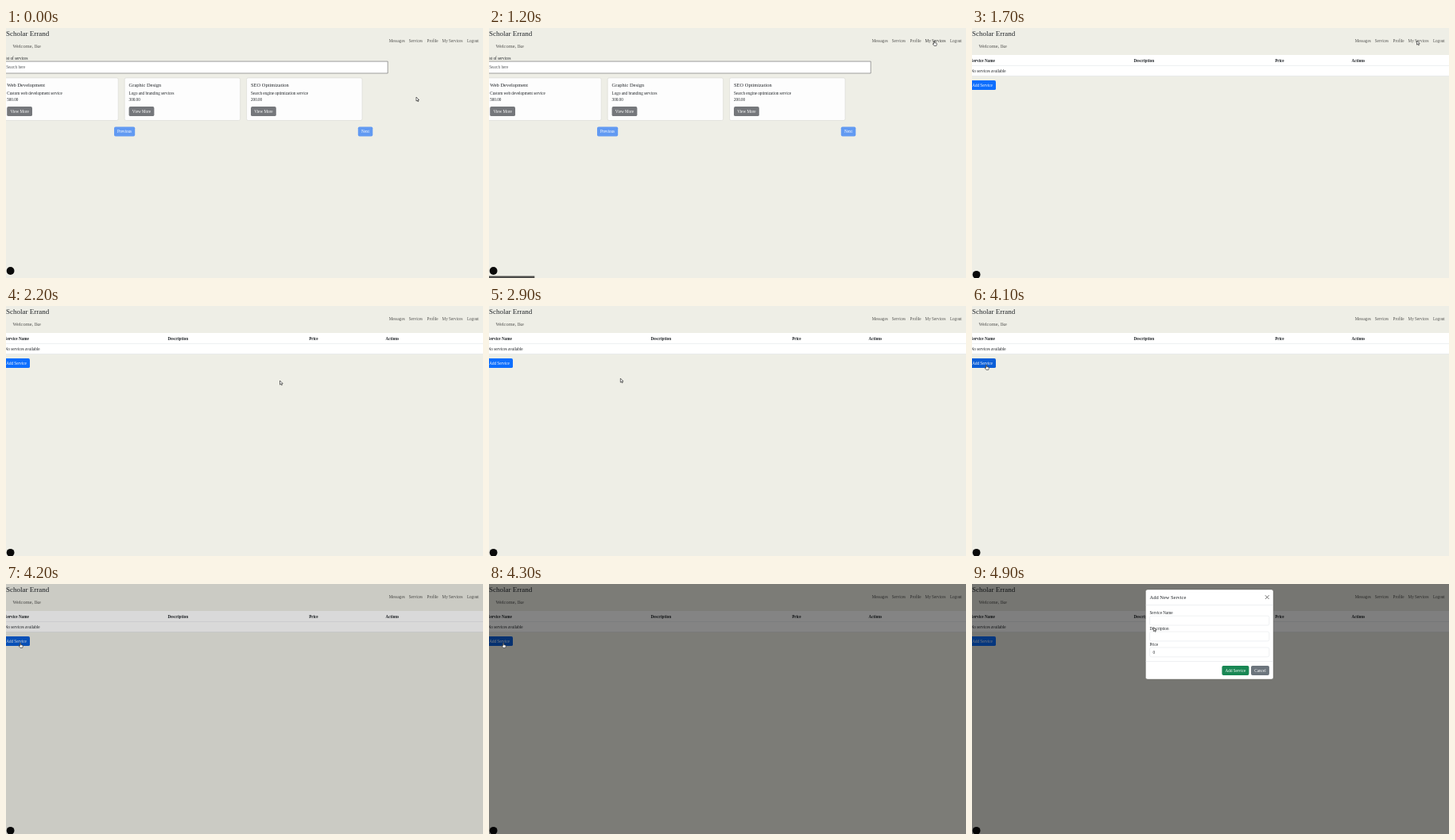
An HTML page with a canvas for the animation above (5000 ms loop, 600 by 315 pixels).

```html
<!DOCTYPE html>
<html lang="en">
<head>
<meta charset="utf-8">
<title>Service dashboard</title>
<style>
html, body { margin: 0; width: 100%; height: 100%; overflow: hidden; background: #eeeee6; }
canvas { display: block; width: 600px; height: 315px; }
</style>
</head>
<body>
<canvas id="stage" width="600" height="315"></canvas>
<script>
const ctx = document.getElementById('stage').getContext('2d');
const LOOP = 5000, STEP = 100;
const ZOOM = 0.3215; // page pixels to stage pixels
const INK = '#212529', RULE = '#dee2e6';

const clamp = (v) => Math.max(0, Math.min(1, v));
const easeOut = (p) => 1 - Math.pow(1 - p, 2.2);

function text(str, x, y, { size = 16, color = INK, bold = false, align = 'left' } = {}) {
  ctx.save();
  ctx.translate(x, y);
  ctx.scale(ZOOM, ZOOM);
  ctx.font = `${bold ? 'bold ' : ''}${size}px "Liberation Serif", serif`;
  ctx.textAlign = align;
  ctx.fillStyle = color;
  ctx.fillText(str, 0, 0);
  ctx.restore();
}

function box(x, y, w, h, fill, { radius = 0, stroke, line = 0.5 } = {}) {
  ctx.beginPath();
  ctx.roundRect(x, y, w, h, radius);
  ctx.fillStyle = fill;
  ctx.fill();
  if (stroke) {
    ctx.strokeStyle = stroke;
    ctx.lineWidth = line;
    ctx.stroke();
  }
}

function button(label, x, y, w, fill) {
  box(x, y, w, 12.1, fill, { radius: 1.9 });
  text(label, x + w / 2, y + 7.7, { color: '#fff', align: 'center' });
}

function header(hover) {
  text('Scholar Errand', 0, 10, { size: 28 });
  text('Welcome, Ike', 8.4, 25, { size: 20, color: 'rgba(0,0,0,.65)' });
  const links = [['Messages', 481.7], ['Services', 506.7], ['Profile', 529.6],
                 ['My Services', 548.6], ['Logout', 579.9]];
  for (const [label, x] of links) {
    const alpha = hover && label === 'My Services' ? 0.8 : 0.65;
    text(label, x, 17.6, { color: `rgba(0,0,0,${alpha})` });
  }
}

function badge(y) {
  ctx.fillStyle = '#0a0a0a';
  ctx.beginPath();
  ctx.arc(5.6, y, 4.9, 0, Math.PI * 2);
  ctx.fill();
}

function listPage(t) {
  text('List of services', -3.9, 39.8);
  box(-4, 42.1, 484.2, 14.9, '#fff', { stroke: '#777', line: 0.7 });
  text('Search here', 0.2, 51.3, { color: '#595c5f' });
  const cards = [
    ['Web Development', 'Custom web development service', '500.00'],
    ['Graphic Design', 'Logo and branding services', '300.00'],
    ['SEO Optimization', 'Search engine optimization service', '200.00']
  ];
  cards.forEach(([name, about, price], i) => {
    const x = 1.2 + i * 153.4;
    box(x - 5.4, 62.9, 145.4, 53.6, '#fdfdfd', { radius: 1.9, stroke: '#d3d3cd' });
    text(name, x, 74.2, { size: 20 });
    text(about, x, 83.8);
    text(price, x, 91.6);
    button('View More', x, 99, 31.8, '#75777b');
  });
  button('Previous', 136, 124.4, 26.2, '#629af2');
  button('Next', 442.8, 124.4, 18.5, '#629af2');
  badge(306);
  if (t >= 800 && t < 1400) box(0, 312.5, 57.3, 3, '#4b4b49');
}

function tablePage(t) {
  box(0, 34, 600, 26.4, '#fff');
  box(0, 47, 600, 0.5, RULE);
  box(0, 60.1, 600, 0.5, RULE);
  const columns = [['Service Name', -1.4], ['Description', 203.6], ['Price', 381.2], ['Actions', 477.6]];
  for (const [label, x] of columns) text(label, x, 42.5, { bold: true });
  text('No services available', -1.4, 55.6);
  const hover = t >= 3900 && t < 4400;
  button('Add Service', -4, 66, 34, hover ? '#0b5ed7' : '#0d6efd');
  badge(310.8);
}

function modal(t) {
  const shown = clamp((t - 4305) / 150);
  if (!shown) return;
  ctx.save();
  ctx.globalAlpha = shown;
  ctx.translate(0, -16 * (1 - easeOut(clamp((t - 4305) / 300))));
  box(218.4, 7, 160.6, 113, '#fff', { radius: 2.5, stroke: '#666660', line: 0.4 });
  text('Add New Service', 223.6, 18.9, { size: 20 });
  ctx.strokeStyle = '#555';
  ctx.lineWidth = 0.85;
  ctx.beginPath();
  ctx.moveTo(368.8, 14.2); ctx.lineTo(373.6, 19);
  ctx.moveTo(373.6, 14.2); ctx.lineTo(368.8, 19);
  ctx.stroke();
  box(218.6, 26.3, 160.2, 0.5, RULE);
  ['Service Name', 'Description', 'Price'].forEach((label, i) => {
    const y = 37.7 + i * 19.9;
    text(label, 223.5, y);
    box(223.6, y + 2.5, 150.2, 11.8, '#fff', { radius: 1.9, stroke: RULE });
  });
  text('0', 227.6, 87.6);
  box(218.6, 97.1, 160.2, 0.5, RULE);
  button('Add Service', 314.4, 102.9, 34, '#198754');
  button('Cancel', 351, 102.9, 22.9, '#6c757d');
  ctx.restore();
}

// time, x, y of the pointer tip
const route = [
  [0, 516, 87], [100, 516, 87], [600, 559, 19], [700, 559.5, 16], [1700, 559.5, 16],
  [2200, 344.5, 94], [2800, 190, 92], [3400, 42, 87], [3500, 38, 85],
  [3900, 17.5, 74], [4400, 17.5, 74], [4600, 68, 74], [4900, 228.3, 54.5], [5000, 228.3, 54.5]
];

function pointerAt(t) {
  const i = route.findIndex((k, n) => n > 0 && t <= k[0]);
  const [t0, x0, y0] = route[i - 1], [t1, x1, y1] = route[i];
  const p = (t - t0) / (t1 - t0);
  return [x0 + (x1 - x0) * p, y0 + (y1 - y0) * p];
}

const arrow = new Path2D('M0 0V5.1L1.2 4L2 5.8L2.9 5.4L2.1 3.7H3.7Z');
const hand = new Path2D('M0 .5Q.6-.2 1.1.5V2.6L3.5 3.2Q4 3.5 3.8 4.3L3.2 6.4H.4L-1.4 4.1Q-1.3 3.2-.5 3.7L0 4.1Z');

function pointer(t) {
  const [x, y] = pointerAt(t);
  const overLink = (t >= 700 && t < 1700) || (t >= 3900 && t < 4400);
  const shape = overLink ? hand : arrow;
  ctx.save();
  ctx.translate(x, y);
  ctx.fillStyle = '#fff';
  ctx.strokeStyle = '#222';
  ctx.lineWidth = 0.65;
  ctx.fill(shape);
  ctx.stroke(shape);
  ctx.restore();
}

function draw(t) {
  box(0, 0, 600, 315, '#eeeee6');
  header(t >= 700 && t < 1700);
  (t < 1700 ? listPage : tablePage)(t);
  const dim = 0.5 * clamp((t - 4155) / 150);
  if (dim) box(0, 0, 600, 315, `rgba(0,0,0,${dim})`);
  modal(t);
  pointer(t);
}

function tick() {
  const t = performance.now() % LOOP;
  draw(Math.floor(t / STEP) * STEP);
  requestAnimationFrame(tick);
}
tick();
</script>
</body>
</html>
```
